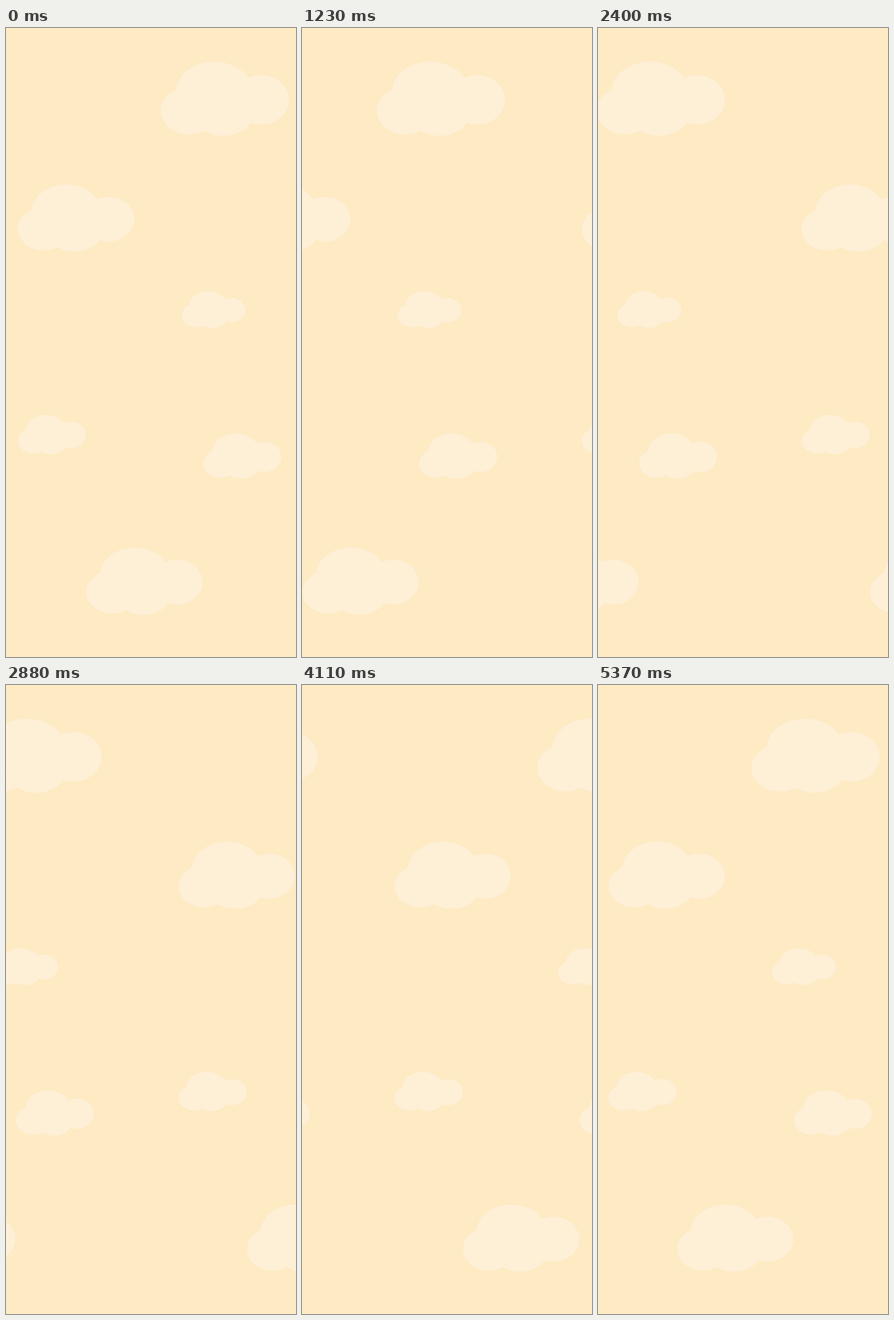
An HTML page for the animation above (5400 ms loop, 414 px wide and 896 px high).

```html
<!DOCTYPE html>
<html lang="en">
<head>
<meta charset="utf-8">
<title>Drifting clouds</title>
<style>
  html, body { margin: 0; width: 100%; height: 100%; overflow: hidden; background: #feeac3; }
  svg { display: block; width: 100%; height: 100%; }
</style>
</head>
<body>
<svg viewBox="0 0 414 896">
  <defs>
    <!-- Drawn from its top left corner, 183.4 wide at scale 1 -->
    <g id="cloud" fill="#feefd7">
      <ellipse cx="41" cy="70" rx="41" ry="33.7"/>
      <ellipse cx="76.5" cy="42" rx="54.5" ry="42"/>
      <ellipse cx="143.3" cy="54.5" rx="40.1" ry="35.3"/>
      <ellipse cx="90" cy="72.6" rx="43.6" ry="33"/>
    </g>
  </defs>
  <g id="sky"></g>
</svg>
<script>
const LOOP = 5400;
const SPEED = 0.09286; // px per ms, to the left
const SPACING = 496.8; // distance between the two copies of the sky

const clouds = [
  { x: 220.8, y: 47.8, scale: 1 },
  { x: 16.8, y: 223, scale: 0.907 },
  { x: 250.6, y: 374.8, scale: 0.497 },
  { x: 16.8, y: 551, scale: 0.531 },
  { x: 281.4, y: 577.6, scale: 0.609 },
  { x: 114.6, y: 740, scale: 0.907 }
];

const sky = document.getElementById("sky");
const place = (x, { y, scale }) =>
  `<use href="#cloud" transform="translate(${x} ${y}) scale(${scale})"/>`;

sky.innerHTML = clouds
  .map(cloud => place(cloud.x, cloud) + place(cloud.x + SPACING, cloud))
  .join("");

function render(time) {
  sky.setAttribute("transform", `translate(${-SPEED * (time % LOOP)} 0)`);
}

const start = performance.now();
function tick() {
  render(performance.now() - start);
  requestAnimationFrame(tick);
}
tick();
</script>
</body>
</html>
```
